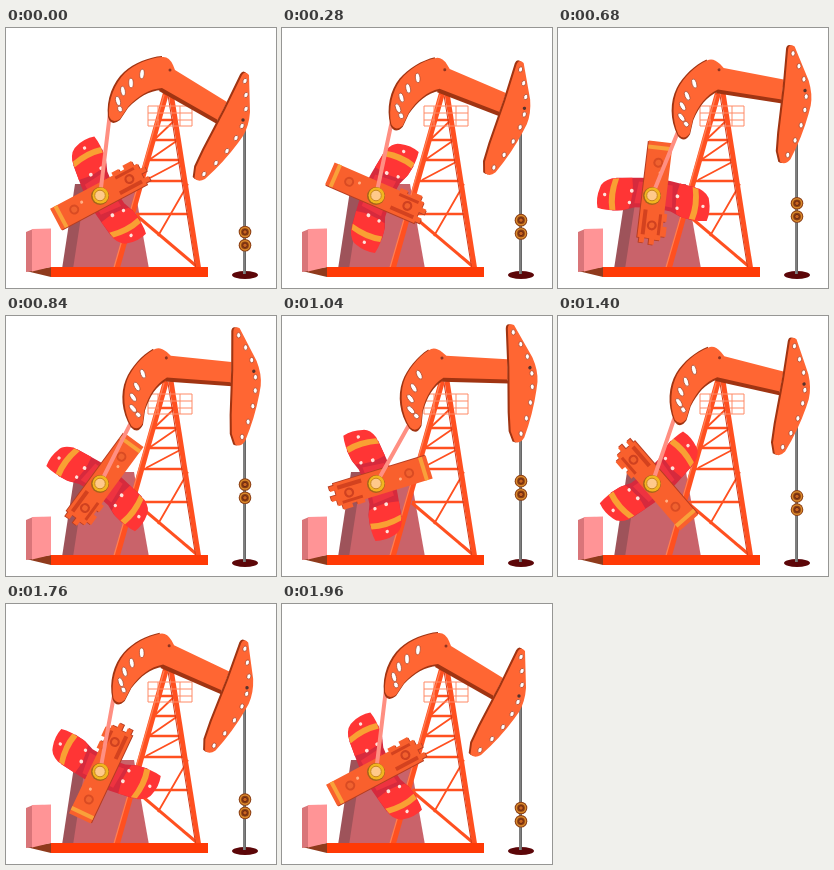
These frames come from a looping animation (270 px wide and 260 px high, 2 s). An HTML page:

```html
<!DOCTYPE html>
<html lang="en">
<head>
<meta charset="utf-8">
<title>Pump jack</title>
<style>
  html, body { margin: 0; width: 100%; height: 100%; overflow: hidden; background: #fff; }
  svg { display: block; width: 100%; height: 100%; }
  .line { fill: none; stroke: #ff5020; }
  .rail { fill: none; stroke: #ff8a66; stroke-width: 1; }
  .face { fill: #ff6633; }
  .side { fill: #a03412; }
  .hole { fill: #fff; stroke: #a84428; stroke-width: .7; }
</style>
</head>
<body>
<svg viewBox="0 0 270 260">
  <defs>
    <g id="weight">
      <path fill="#d62a3d" d="M16 6 L15 16 L12 40 L-21 40 L-19 28 L-15 18 L-14 6Z"/>
      <path fill="#ff3535" d="M14 24 L11 44 Q7 54 0 55 Q-10 58 -20 55 Q-22 45 -19.500 30 L-17 24 Q-2 20 14 24Z"/>
      <path fill="#f9a033" d="M12 37 L10.500 43 Q-6 47 -20.500 43 L-20 37 Q-5 41 12 37Z"/>
      <path fill="#ee3340" d="M11 8 L11 17 L-11 19 L-10 8Z"/>
      <g fill="#ffe3dc">
        <circle cx="-6" cy="49.500" r="1.700"/>
        <circle cx="1" cy="23" r="1.900"/>
        <circle cx="-11" cy="24" r="1.700"/>
      </g>
    </g>
    <g id="bead">
      <circle r="6.300" fill="#8a3d14"/>
      <circle r="4.600" fill="none" stroke="#d98a2b" stroke-width="1.500"/>
      <circle r="2.200" fill="#c9641f" stroke="#5d210d" stroke-width=".8"/>
    </g>
    <path id="head" d="M236 47 Q239 42 243 47 L244 84 Q243 98 237 108 L232 115 Q218 134 199 151 Q192 155 188.500 150 L190 139 L198 122 L219 82Z"/>
    <path id="arm" d="M53 -12 V12 H-18 V15 H-26 V12 H-31 V16 H-41 V11 H-45 V5 H-50 V0 H-44 V-5 H-49 V-10 H-44 V-12Z"/>
  </defs>

  <!-- gear housing -->
  <path fill="#9e535a" d="M69 156 H82 L69 241 H56Z"/>
  <path fill="#c9636a" d="M80 156 H128 L143 241 H67Z"/>

  <!-- tower -->
  <g class="line">
    <path stroke-width="1.800" d="M169 92 L148 112 M172 112 L143 132 M176 133 L140 152 M182 156 L152 208"/>
    <path stroke-width="2.500" d="M153 92 H170 M147 112 H173 M142 132 H176 M138 153 H180 M130 186 H185"/>
    <path stroke-width="3" d="M130 187 L195 242"/>
    <path stroke-width="5" d="M165 65 L193 243"/>
    <path stroke="#d23c1a" stroke-width="1" d="M162 67 L190 242"/>
    <path stroke-width="6" d="M160 65 L110 243"/>
    <path stroke="#ff8055" stroke-width="1.200" d="M158 67 L107 243"/>
  </g>
  <path class="rail" d="M142 78 H186 V98 H142Z M142 85 H186 M142 92 H153 M172 92 H186 M152 78 V98 M174 78 V98"/>

  <!-- base and box -->
  <path fill="#8f3a1c" d="M20 243 L45 239 V249Z"/>
  <path fill="#ff3a06" d="M45 239 H202 V249 H45Z"/>
  <path fill="#d97579" d="M20 204 L27 201 V243 L20 244Z"/>
  <path fill="#ff9496" d="M26 201 L45 200.500 V239 L26 243.500Z"/>

  <!-- well -->
  <ellipse cx="239" cy="247" rx="13" ry="4" fill="#5c0608"/>
  <path stroke="#666" stroke-width="3" d="M238.500 90 V246"/>
  <path stroke="#a5a5a5" stroke-width=".8" d="M238 90 V246"/>
  <g id="beads"><use href="#bead"/><use href="#bead" y="13.300"/></g>

  <!-- crank -->
  <g id="crank">
    <use href="#weight"/>
    <use href="#weight" transform="scale(1 -1)"/>
    <use href="#arm" fill="#b63d22" x="-.8" y="-1"/>
    <use href="#arm" fill="#f9602d"/>
    <path fill="#f9a13a" d="M45 -12 H49 V12 H45Z"/>
    <circle cx="32" r="5" fill="#d94b23"/>
    <circle cx="32" r="3" fill="#f0622f"/>
    <circle cx="22" cy="3" r="1.500" fill="#ffb086"/>
    <path fill="#d3421f" d="M-16 -9 H-41 V-5 H-16Z M-19 7 H-40 V10 H-19Z"/>
    <circle cx="-31" cy="1" r="5" fill="#cf4120"/>
    <circle cx="-31" cy="1" r="2.800" fill="#f2602d"/>
  </g>
  <path id="rod" stroke="#ff8f82" stroke-width="4" stroke-linecap="round"/>
  <circle cx="94" cy="168" r="9" fill="#a8651a"/>
  <circle cx="94.500" cy="167.500" r="8" fill="#f2b61f"/>
  <circle cx="94" cy="167.500" r="5.300" fill="#ffc98a" stroke="#c88720" stroke-width="1"/>

  <!-- walking beam -->
  <g id="beam">
    <path class="side" d="M156 57 L212 88 L211 96 L153 63Z"/>
    <path class="side" d="M102 89 C100 71 107 54 118 44 C128 35 143 29 156 28 L156 62 C142 63 133 69 122 80 L114 92 Q105 99 102 89Z"/>
    <path class="face" d="M103 88 C102 72 109 55 119 45 C129 36 143 30 156 29 Q163 28 167 37 L169 42 L221 74 L212 92 L156 60 C143 61 132 68 122 79 L114 91 Q106 96 103 88Z"/>
    <circle cx="164" cy="42" r="1.500" fill="#8f3420"/>
    <use href="#head" class="side" x="-1.800" y="-1"/>
    <use href="#head" class="face"/>
    <circle cx="237" cy="92" r="1.700" fill="#56322c"/>
  </g>
</svg>

<script>
const STEP = 40, FRAMES = 50, TURN = 49;
const PIVOT = [162, 50], HUB = [94, 168], AXLE = [96.5, 166.5], PIN = [104, 85];
const SWING = 30, BEAD_LOW = 204, BEAD_PER_DEG = 1.38;
const el = id => document.getElementById(id);
const beam = el("beam"), crank = el("crank"), rod = el("rod"), beads = el("beads");

function hole(x, y, rx, ry, tilt) {
  const e = document.createElementNS("http://www.w3.org/2000/svg", "ellipse");
  e.setAttribute("class", "hole");
  e.setAttribute("rx", rx);
  e.setAttribute("ry", ry);
  e.setAttribute("transform", `translate(${x} ${y}) rotate(${tilt})`);
  beam.append(e);
}
[[114, 81], [112, 73], [117, 63], [125, 55], [136, 46]]
  .forEach(([x, y], i) => hole(x, y, 2.3, i ? 4.8 : 3, i * 6 - 20));
[[239, 53], [240, 67], [240, 81], [236, 98], [230, 110], [221, 123], [210, 135], [198, 146]]
  .forEach(([x, y]) => hole(x, y, 2, 2.7, 25));

function turn([x, y], deg) {
  const a = deg * Math.PI / 180, c = Math.cos(a), s = Math.sin(a);
  const dx = x - PIVOT[0], dy = y - PIVOT[1];
  return [PIVOT[0] + dx * c - dy * s, PIVOT[1] + dx * s + dy * c];
}

function draw(now) {
  const p = Math.floor(now / STEP) % FRAMES / TURN;
  const lift = SWING * (1 - Math.abs(1 - 2 * p));
  beam.setAttribute("transform", `rotate(${-lift} ${PIVOT})`);
  crank.setAttribute("transform", `translate(${AXLE}) rotate(${152 + 360 * p})`);
  rod.setAttribute("d", `M${HUB} L${turn(PIN, -lift)}`);
  beads.setAttribute("transform", `translate(239 ${BEAD_LOW - BEAD_PER_DEG * lift})`);
}

const start = performance.now();
function tick() {
  draw(performance.now() - start);
  requestAnimationFrame(tick);
}
tick();
</script>
</body>
</html>
```
